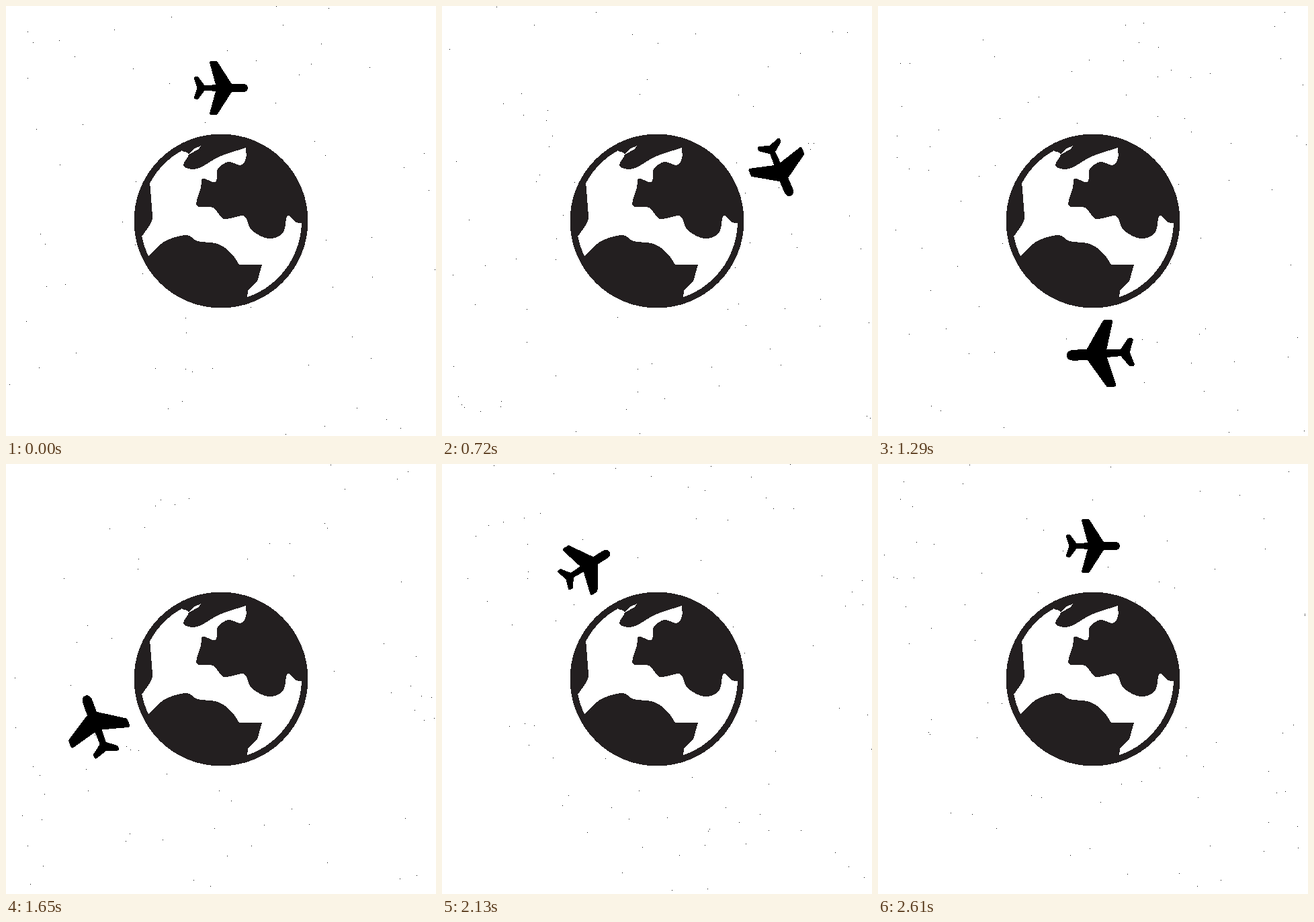
Write an HTML page with a canvas that moves like this. It is 640 px wide and 640 px high and loops after 2640 ms.

```html
<!DOCTYPE html>
<html lang="en">
<head>
<meta charset="utf-8">
<title>Plane around the globe</title>
<style>
  html, body { margin: 0; width: 100%; height: 100%; overflow: hidden; background: #fff; }
  canvas, svg { position: absolute; left: 0; top: 0; width: 640px; height: 640px; display: block; }
</style>
</head>
<body>
<canvas id="specks" width="640" height="640"></canvas>
<svg viewBox="0 0 640 640" shape-rendering="crispEdges">
  <defs>
    <clipPath id="disc"><circle cx="320" cy="320" r="129"/></clipPath>
    <path id="half" d="M47 0Q47-5 38-5H18L-9-47H-18L-6-3-32-2-44-18H-47L-41 0Z"/>
  </defs>
  <circle cx="320" cy="320" r="124.75" fill="#fff" stroke="#231f20" stroke-width="9.5"/>
  <g id="land" fill="#231f20" clip-path="url(#disc)"></g>
  <path d="M272 221L279 213 290 208 287 213Z" fill="#fff"/>
  <g id="plane" stroke="#000" stroke-width="6" stroke-linejoin="round">
    <use href="#half"/><use href="#half" transform="scale(1 -1)"/>
  </g>
</svg>
<script>
const STEP = 30, LOOP = 2640, CENTER = 320, ORBIT = 198, SPECKS = 84;

// A smooth coast through a few points, then straight edges closing it outside the disc
const lands = [
  ["357,212 357,227 349,237 331,232 315,243 312,262 293,257 290,270 284,297 308,300 322,316 334,316 355,313 365,333 390,346 412,338 419,312 432,322 445,323",
    "H480V180H357"],
  ["262,216 272,221 264,238 285,242 318,224 357,211", "V180H262"],
  ["214,262 217,300 217,320 202,343", "H180V262"],
  ["211,374 235,351 268,341 285,350 315,354 335,368 347,385", "H381L374 410 360 423 357 460H180V374"]
];

function smooth(text) {
  const p = text.split(" ").map(s => s.split(",").map(Number));
  const at = i => p[Math.max(0, Math.min(p.length - 1, i))];
  let d = "M" + p[0];
  for (let i = 0; i < p.length - 1; i++) {
    const [a, b, c, e] = [at(i - 1), at(i), at(i + 1), at(i + 2)];
    const c1 = b.map((v, k) => v + (c[k] - a[k]) / 6);
    const c2 = c.map((v, k) => v - (e[k] - b[k]) / 6);
    d += `C${c1} ${c2} ${c}`;
  }
  return d;
}

for (const [coast, edges] of lands) {
  const path = document.createElementNS("http://www.w3.org/2000/svg", "path");
  path.setAttribute("d", smooth(coast) + edges + "Z");
  document.getElementById("land").append(path);
}

const ease = u => u * u * (3 - 2 * u);

function random(seed) {
  let s = seed;
  return () => {
    s = (s + 0x6D2B79F5) | 0;
    let t = Math.imul(s ^ (s >>> 15), 1 | s);
    t = (t + Math.imul(t ^ (t >>> 7), 61 | t)) ^ t;
    return ((t ^ (t >>> 14)) >>> 0) / 4294967296;
  };
}

const ctx = document.getElementById("specks").getContext("2d");
const plane = document.getElementById("plane");

function draw(n) {
  const rnd = random(n * 7919 + 11);
  const spot = () => Math.floor(rnd() * 640);
  ctx.clearRect(0, 0, 640, 640);
  for (let i = 0; i < SPECKS; i++) ctx.fillRect(spot(), spot(), 1, 1);

  // One eased turn; the plane is largest at the bottom
  const angle = 360 * ease(n * STEP / (LOOP - STEP));
  const size = .9 - .1 * Math.cos(angle * Math.PI / 180);
  plane.setAttribute("transform",
    `translate(${CENTER} ${CENTER}) rotate(${angle}) translate(0 ${-ORBIT}) scale(${size})`);
}

const start = performance.now();
let shown = -1;
function tick() {
  const n = Math.floor((performance.now() - start) % LOOP / STEP);
  if (n !== shown) draw(shown = n);
  requestAnimationFrame(tick);
}
tick();
</script>
</body>
</html>
```
